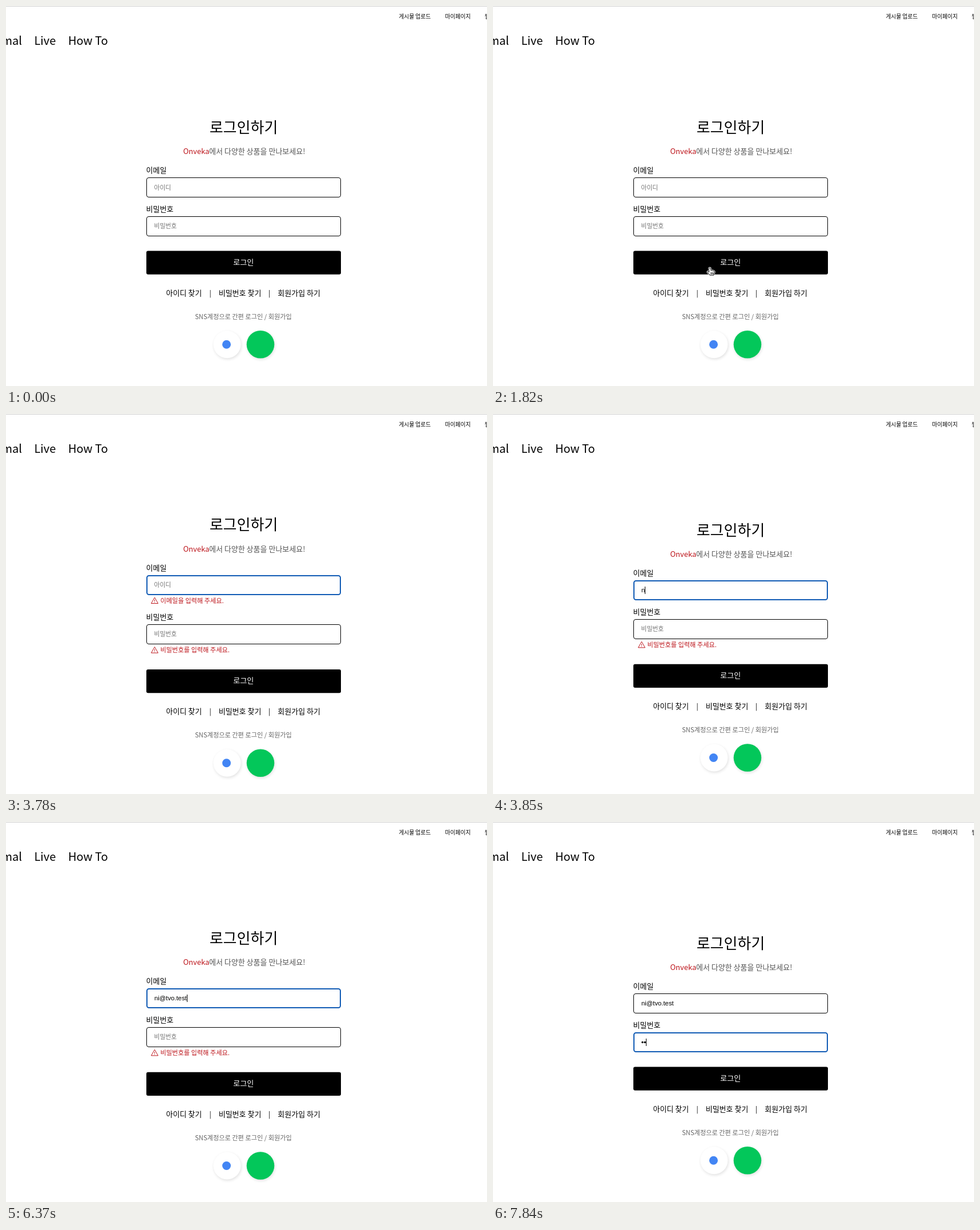
Animation of 843x665 px, one loop 8 s. Source, as an HTML page with a canvas:

```html
<!DOCTYPE html>
<html lang="ko">
<head>
<meta charset="utf-8">
<title>로그인하기</title>
<style>
  html, body { margin: 0; width: 100%; height: 100%; overflow: hidden; background: #fff; }
  canvas { display: block; }
</style>
</head>
<body>
<canvas id="stage" width="843" height="665"></canvas>
<script>
const ctx = document.getElementById('stage').getContext('2d');
const LOOP = 8000, STEP = 70, BLINK = 560;
const SANS = '"Noto Sans CJK KR", "Noto Sans CJK", sans-serif';
const INPUT = '"Liberation Sans", Arial, sans-serif';
const RED = '#bd161c', BLUE = '#115bb5', GREY = '#757575';
const LEFT = 246, WIDTH = 341, PAD = 260, ROW = 18.5;

const EMAIL = 'ni@tvo.test';
// [time, characters shown]
const emailKeys = [[1820, 0], [3850, 1], [3920, 2], [4900, 3], [5250, 4], [5460, 5],
  [5600, 6], [5740, 7], [5950, 9], [6090, 10], [6370, 11]];
const passwordKeys = [[7280, 0], [7700, 1], [7840, 2]];
const SUBMIT = 1890, SWITCH = 7280;

// [time, x, y] of the pointer's hot spot
const track = [[280, 359, 343], [700, 394, 526], [1050, 380, 458], [2240, 380, 458],
  [2310, 377, 440], [2450, 356, 345], [2520, 348, 303], [2730, 352, 297],
  [6650, 352, 297], [7070, 352, 370], [LOOP, 352, 370]];

const lastKey = (keys, t) => keys.filter(k => k[0] <= t).pop() || [0, 0];

function text(str, x, middle, size, color = '#000', align = 'left', weight = 400) {
  ctx.font = `${weight} ${size}px ${SANS}`;
  ctx.textAlign = align;
  ctx.fillStyle = color;
  ctx.fillText(str, x, middle + size * 0.38);
}

function roundBox(x, y, w, h, r) {
  ctx.beginPath();
  ctx.roundRect(x, y, w, h, r);
}

function disc(x, y, r, color) {
  ctx.beginPath();
  ctx.arc(x, y, r, 0, Math.PI * 2);
  ctx.fillStyle = color;
  ctx.fill();
}

function field(y, focused) {
  const line = focused ? 2 : 1;
  const top = Math.round(y);
  roundBox(LEFT + line / 2, top + line / 2, WIDTH - line, 35 - line, 3.5);
  ctx.strokeStyle = focused ? BLUE : '#000';
  ctx.lineWidth = line;
  ctx.stroke();
}

function caret(x, y) {
  ctx.fillStyle = '#000';
  ctx.fillRect(Math.round(x), Math.round(y + 11), 1, 13);
}

function errorRow(str, y) {
  ctx.strokeStyle = RED;
  ctx.lineWidth = 1;
  ctx.lineJoin = 'round';
  ctx.beginPath();
  ctx.moveTo(260.5, y - 5.5);
  ctx.lineTo(266.5, y + 5);
  ctx.lineTo(254.5, y + 5);
  ctx.closePath();
  ctx.moveTo(260.5, y - 1.5);
  ctx.lineTo(260.5, y + 1.2);
  ctx.moveTo(260.5, y + 2.4);
  ctx.lineTo(260.5, y + 3.4);
  ctx.stroke();
  text(str, 270.5, y, 11.2, RED);
}

function header() {
  ctx.fillStyle = '#d2d2d2';
  ctx.fillRect(0, 0, 843, 1);
  text('게시물 업로드', 688.5, 18, 9.75);
  text('마이페이지', 769.5, 18, 9.75);
  text('찜목록', 839, 18, 9.75);
  text('Normal', 28, 60.6, 20, '#000', 'right');
  text('Live', 49.5, 60.6, 20);
  text('How To', 109, 60.6, 20);
}

function socialButtons(y) {
  ctx.save();
  ctx.shadowColor = 'rgba(0,0,0,.12)';
  ctx.shadowBlur = 5;
  ctx.shadowOffsetX = 1;
  ctx.shadowOffsetY = 2;
  disc(387.5, y, 24, '#fff');
  disc(446, y, 24.3, '#03c75a');
  ctx.restore();
  disc(386.5, y, 7.5, '#4285f4');
}

function emailContent(t, y, focused) {
  const [time, count] = lastKey(emailKeys, t);
  const typed = EMAIL.slice(0, count);
  if (!count) text('아이디', PAD - 0.5, y + 17, 10.8, GREY);
  ctx.font = `11.3px ${INPUT}`;
  ctx.textAlign = 'left';
  ctx.fillStyle = '#000';
  ctx.fillText(typed, PAD, y + 21);
  if (focused && blinkOn(t, time)) caret(PAD + ctx.measureText(typed).width, y);
}

function passwordContent(t, y, focused) {
  const [time, count] = lastKey(passwordKeys, t);
  if (!count) text('비밀번호', PAD - 0.5, y + 17, 10.8, GREY);
  for (let i = 0; i < count; i++) disc(262 + i * 4.2, y + 17.2, 1.7, '#000');
  if (focused && blinkOn(t, time)) caret(PAD + count * 4.2, y);
}

const blinkOn = (t, since) => Math.floor((t - since) / BLINK) % 2 === 0;

function form(t) {
  const emailError = t >= SUBMIT && t < 3850;
  const passwordError = t >= SUBMIT && t < 7700;
  const shift = (emailError + passwordError) * ROW / 2;
  const emailY = 300.4 - shift;
  const passwordY = 368.3 - shift + (emailError ? ROW : 0);
  const buttonY = 428.6 + shift;
  const emailFocus = t >= SUBMIT && t < SWITCH;
  const passwordFocus = t >= SWITCH;

  text('로그인하기', 416.5, 212 - shift, 26, '#000', 'center');
  text('Onveka', 356.3, 254.2 - shift, 13, RED, 'right');
  text('에서 다양한 상품을 만나보세요!', 356, 254.2 - shift, 13, '#555');

  text('이메일', 245.5, emailY - 13, 13);
  field(emailY, emailFocus);
  emailContent(t, emailY, emailFocus);
  if (emailError) errorRow('이메일을 입력해 주세요.', emailY + 44.6);

  text('비밀번호', 245.5, passwordY - 13, 13);
  field(passwordY, passwordFocus);
  passwordContent(t, passwordY, passwordFocus);
  if (passwordError) errorRow('비밀번호를 입력해 주세요.', passwordY + 44.8);

  roundBox(LEFT, buttonY, WIDTH, 41.2, 3);
  ctx.fillStyle = '#000';
  ctx.fill();
  text('로그인', 416.3, 447.8 + shift, 13, '#fff', 'center', 500);

  const linksY = 502 + shift;
  text('아이디 찾기', 280.5, linksY, 13);
  text('|', 358, linksY, 12, '#000', 'center');
  text('비밀번호 찾기', 372.7, linksY, 13);
  text('|', 461.5, linksY, 12, '#000', 'center');
  text('회원가입 하기', 476.3, linksY, 13);
  text('SNS계정으로 간편 로그인 / 회원가입', 416, 543.5 + shift, 11.2, '#666', 'center');
  socialButtons(592.3 + shift);

  const inside = (y, top, height) => y >= top && y <= top + height;
  return y => {
    if (inside(y, emailY, 35) || inside(y, passwordY, 35)) return 'beam';
    if (inside(y, buttonY, 41) || inside(y, linksY - 8, 16)) return 'hand';
    return 'arrow';
  };
}

const shapes = {
  arrow: new Path2D('M0 0V14L3.3 11L5.6 16L8 15L5.8 10.1H10Z'),
  hand: new Path2D('M-1.5 1Q0-1 1.5 1L2 5Q3.5 4 4.5 5.4Q6 4.6 7 6Q8.6 6 8.5 8L7.6 11L7 13H0L-4.5 7.5Q-4 5.5-1.6 7.5Z'),
  beam: new Path2D('M-3-7Q0-7 0-5Q0-7 3-7M0-5V5M-3 7Q0 7 0 5Q0 7 3 7M-1.5 2H1.5')
};

function pointerAt(t) {
  const i = track.findIndex(k => k[0] > t);
  const [t0, x0, y0] = track[i - 1], [t1, x1, y1] = track[i];
  const p = (t - t0) / (t1 - t0);
  const e = t < 1050 ? p * p * (3 - 2 * p) : p;
  return [x0 + (x1 - x0) * e, y0 + (y1 - y0) * e];
}

function pointer(t, kindAt) {
  const visible = (t >= 280 && t < 3780) || (t >= 6720 && t < 7630);
  if (!visible) return;
  const [x, y] = pointerAt(t);
  const kind = kindAt(y), shape = shapes[kind];
  ctx.save();
  ctx.translate(x, y);
  ctx.lineJoin = ctx.lineCap = 'round';
  ctx.strokeStyle = '#fff';
  ctx.lineWidth = kind === 'beam' ? 3 : 2.4;
  ctx.stroke(shape);
  if (kind === 'beam') {
    ctx.strokeStyle = '#000';
    ctx.lineWidth = 1.2;
    ctx.stroke(shape);
  } else {
    ctx.fillStyle = kind === 'hand' ? '#fff' : '#000';
    ctx.fill(shape);
  }
  if (kind === 'hand') {
    ctx.strokeStyle = '#000';
    ctx.lineWidth = 1;
    ctx.stroke(shape);
    ctx.stroke(new Path2D('M2 8.5V11M4 8.5V11M6 8.5V11'));
  }
  ctx.restore();
}

function draw() {
  const t = Math.floor((performance.now() % LOOP) / STEP) * STEP;
  ctx.fillStyle = '#fff';
  ctx.fillRect(0, 0, 843, 665);
  header();
  pointer(t, form(t));
  requestAnimationFrame(draw);
}
draw();
</script>
</body>
</html>
```
